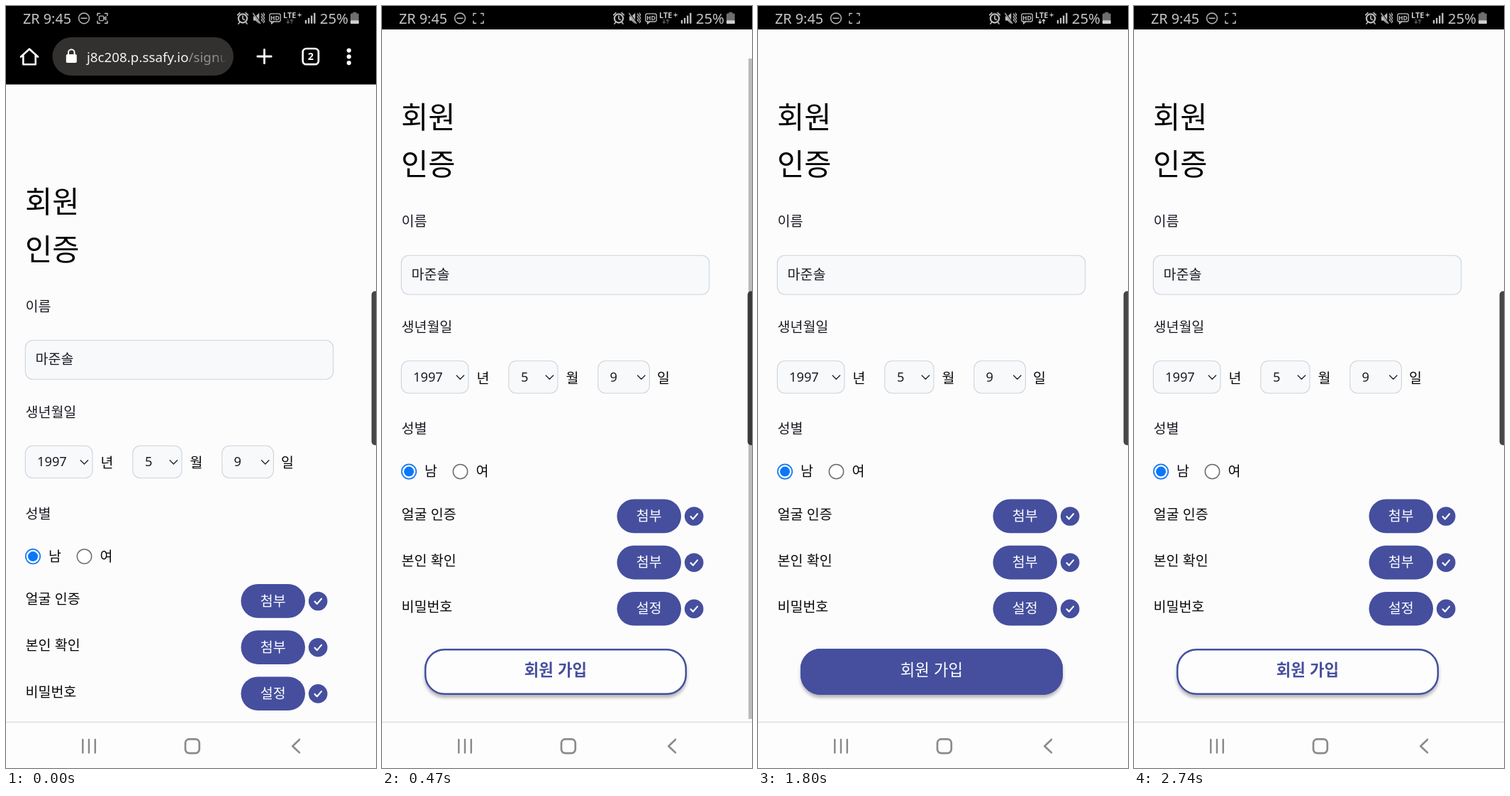
An HTML page that plays this animation: 522x1073 px, repeating every 2830 ms.

```html
<!DOCTYPE html>
<html lang="ko">
<head>
<meta charset="utf-8">
<title>회원 인증</title>
<style>
  html, body { margin: 0; width: 100%; height: 100%; overflow: hidden; background: #fcfcfd; }
  svg { display: block; width: 100vw; height: 100vh; }
  text { font-family: "Noto Sans CJK KR", sans-serif; white-space: pre; }
  .latin { font-family: "Noto Sans", sans-serif; }
  .line { fill: none; stroke-linecap: round; stroke-linejoin: round; }
</style>
</head>
<body>
<svg id="stage" viewBox="0 0 522 1073"></svg>
<script>
const LOOP = 2830;
const SCROLL = 119.5;
const TOOLBAR = 78;
const INDIGO = '#454f9e';
const INK = '#1b1b24';

const text = (x, y, size, fill, value, extra = '') =>
  `<text x="${x}" y="${y}" font-size="${size}" fill="${fill}" ${extra}>${value}</text>`;
const latin = (x, y, size, fill, value, extra = '') =>
  text(x, y, size, fill, value, 'class="latin" ' + extra);
const middle = 'text-anchor="middle"';
const box = (x, y, w, h, r, fill, extra = '') =>
  `<rect x="${x}" y="${y}" width="${w}" height="${h}" rx="${r}" fill="${fill}" ${extra}/>`;
const line = (d, color, width, extra = '') =>
  `<path class="line" d="${d}" stroke="${color}" stroke-width="${width}" ${extra}/>`;
const dot = (x, y, r, fill, extra = '') =>
  `<circle cx="${x}" cy="${y}" r="${r}" fill="${fill}" ${extra}/>`;
const field = (x, y, w, h) => box(x, y, w, h, 10.5, '#f7f9fb', 'stroke="#cfd3da" stroke-width="1.1"');

const select = (x, w, valueX, value, unitX, unit) =>
  field(x, 499.7, w, 45.6) +
  latin(valueX, 528.5, 18.3, INK, value) +
  line(`M${x + w - 16.8} 520.3l5.2 5.2 5.2-5.2`, '#222733', 1.4) +
  text(unitX, 530.5, 19.5, '#08080c', unit);

const row = (index, label, action) => `<g transform="translate(0 ${index * 65.2})">` +
  text(27.5, 722.8, 19.5, '#08080c', label) +
  box(331.5, 694.5, 90.5, 47.7, 23.8, INDIGO) +
  text(376.8, 725, 19.5, '#fff', action, middle) +
  dot(440.2, 718.5, 13.3, INDIGO) +
  line('M435.6 719l3.2 3.4 6.2-7.2', '#fff', 2.2) + '</g>';

const form =
  text(27, 171.5, 41.5, '#000', '회원') +
  text(27, 238, 41.5, '#000', '인증') +
  text(27.5, 310.3, 19.5, INK, '이름') +
  field(27.3, 351.3, 434.4, 55) +
  text(41.5, 384.6, 19.5, INK, '마준솔') +
  text(27.5, 459.3, 19.5, INK, '생년월일') +
  select(27.3, 94.7, 44, '1997', 133.5, '년') +
  select(178.8, 69.2, 196, '5', 259.5, '월') +
  select(304.8, 72.6, 321.5, '9', 388, '일') +
  text(27.5, 602, 19.5, INK, '성별') +
  dot(38, 655.6, 10.2, '#fff', 'stroke="#1479f0" stroke-width="1.7"') +
  dot(38, 655.6, 7, '#0a78f8') +
  text(60, 662, 19.5, '#08080c', '남') +
  dot(110.5, 655.6, 10.2, '#fff', 'stroke="#6c6c70" stroke-width="1.5"') +
  text(132.5, 662, 19.5, '#08080c', '여') +
  row(0, '얼굴 인증', '첨부') + row(1, '본인 확인', '첨부') + row(2, '비밀번호', '설정') +
  `<g filter="url(#shadow)">${box(61.2, 906.2, 367.6, 62.6, 27, '#fdfdfe', `stroke="${INDIGO}" stroke-width="2.5"`)}</g>` +
  text(244.8, 943.3, 22.3, INDIGO, '회원 가입', middle + ' font-weight="700"') +
  '<g id="pressed">' + box(60, 905, 370, 65, 28, INDIGO) +
  text(244.8, 943.3, 22.3, '#fff', '회원 가입', middle) + '</g>';

const modal =
  box(0, 33, 522, 976, 0, '#f3f4f6', 'opacity=".5"') +
  box(57.7, 333.5, 406.8, 375.7, 30, '#fdfdfe', 'stroke="#c6c8d2" stroke-width="1.1"') +
  text(107, 410.3, 28, '#111827', '회원가입 완료', 'font-weight="700"') +
  line('M386.3 397.5l13.8 13.8M400.1 397.5l-13.8 13.8', '#9299a8', 2.3) +
  line('M84 448.5H437M84 549.5H437', '#eaebef', 1.2) +
  text(117.5, 505.6, 22.3, '#666d7a', '환영합니다') +
  box(216, 583, 90, 54, 10, '#1d49d0') +
  text(261, 616.8, 20, '#fff', '확인', middle);

const toolbar =
  box(0, 0, 522, 110.5, 0, '#000') +
  line('M21 71.5L33 60.5 45 71.5M24.3 69.5V82.3H41.7V69.5', '#fff', 2.6) +
  box(65.5, 44, 255.5, 54, 27, '#32312f') +
  box(84.8, 68, 15, 12, 1.8, '#fff') +
  line('M88 68v-2.4a4.3 4.3 0 0 1 8.6 0v2.4', '#fff', 2) +
  `<svg x="0" width="310" height="110">${latin(114, 78.6, 18.8, '#f4f4f4',
    'j8c208.p.ssafy.io<tspan fill="#91908f">/signup</tspan>')}</svg>` +
  box(296, 56, 16, 30, 0, 'url(#fade)') +
  line('M354.8 71H374.2M364.5 61.3V80.7', '#fff', 2.8) +
  box(418.7, 60, 22.2, 22.2, 5, 'none', 'stroke="#fff" stroke-width="2.7"') +
  latin(429.8, 76.3, 14.5, '#fff', '2', middle + ' font-weight="700"') +
  [62.5, 71.3, 80.1].map(y => dot(483.8, y, 3.1, '#fff')).join('');

const GREY = '#bdbdbd';
const statusBar =
  box(0, 0, 522, 33, 0, '#000') +
  latin(24, 24.7, 19.8, '#c4c4c4', 'ZR 9:45') +
  dot(110, 17.3, 7.4, 'none', `stroke="${GREY}" stroke-width="1.5"`) +
  line('M106 17.3h8', GREY, 1.5) +
  line('M129 13.5v-3h3.5M139.5 10.5h3.5v3M143 21.2v3h-3.5M132.5 24.2H129v-3', GREY, 1.5) +
  '<g id="camera">' + box(131.5, 14.2, 6.4, 6.4, 1.5, 'none', `stroke="${GREY}" stroke-width="1.3"`) +
  line('M138 17.3l3-2.3v4.6z', GREY, 1.2) + '</g>' +
  // alarm clock
  dot(334, 17.5, 6.1, 'none', `stroke="${GREY}" stroke-width="2.2"`) +
  line('M334 14v4l2.6 1.4M326.7 12.6l3.2-3M341.3 12.6l-3.2-3M329.5 23l-1.5 2M338.5 23l1.5 2', GREY, 1.7) +
  // muted speaker with vibration
  `<path d="M349 14.5h3.2l5-4.7v15.2l-5-4.6H349z" fill="${GREY}"/>` +
  line('M349 10l10 14.5', '#000', 2.4) + line('M348.6 10.4l10 14', GREY, 1.4) +
  line('M360.5 11l1.5 2-1.5 2.3 1.5 2.3-1.5 2.3 1.5 2M363.3 10l1.3 2.4-1.3 2.3 1.3 2.3-1.3 2.3 1.3 2.3-1.3 2', GREY, 1.3) +
  box(371.8, 10.8, 15.4, 11.2, 2.5, 'none', `stroke="${GREY}" stroke-width="1.3"`) +
  line('M374.5 22v3l3.5-3', GREY, 1.3) +
  latin(379.5, 19.7, 8.6, GREY, 'HD', middle + ' font-weight="700"') +
  latin(391, 17.3, 10.8, '#c8c8c8', 'LTE', 'font-weight="600"') +
  latin(411, 15.7, 11, '#c8c8c8', '+', 'font-weight="700"') +
  line('M397.8 18.8v5.4l-1.7-1.7M397.8 24.2l1.7-1.7M403 24.4V19l-1.7 1.7M403 19l1.7 1.7', '#d8d8d8', 1.3, 'id="arrows"') +
  [5, 8, 11.3, 15].map((h, i) => box(421.8 + i * 4.1, 24.7 - h, 2.4, h, .4, GREY)).join('') +
  latin(442.8, 24.7, 20.4, '#c4c4c4', '25%') +
  box(489.2, 8.8, 5.2, 3, .6, '#6f6f6f') +
  box(486, 10.5, 11.7, 14.5, 1.2, '#6f6f6f') + box(486, 20.3, 11.7, 4.7, 1, '#cfcfcf');

const navBar =
  box(0, 1008, 522, 65, 0, '#fdfdfe') +
  box(0, 1007.7, 522, 1.5, 0, '#dedee2') +
  line('M108.3 1033v18.4M117 1033v18.4M125.8 1033v18.4', '#8a8a8c', 2.5) +
  box(253, 1032.3, 19.8, 19.8, 5.5, 'none', 'stroke="#8a8a8c" stroke-width="2.7"') +
  line('M414 1033l-9.7 9.2 9.7 9.2', '#8a8a8c', 2.6);

document.getElementById('stage').innerHTML = `
  <defs>
    <filter id="shadow" x="-5%" y="-20%" width="110%" height="150%">
      <feDropShadow dx="0" dy="4" stdDeviation="2.2" flood-color="#000" flood-opacity=".28"/>
    </filter>
    <linearGradient id="fade">
      <stop stop-color="#32312f" stop-opacity="0"/><stop offset="1" stop-color="#32312f"/>
    </linearGradient>
  </defs>
  ${box(0, 0, 522, 1073, 0, '#fcfcfd')}
  <g id="form">${form}</g>
  <g id="modal">${modal}</g>
  ${box(517, 36, 6, 930, 0, '#bcbcbe', 'id="scrollbar"')}
  <g id="toolbar">${toolbar}</g>
  ${statusBar}
  ${navBar}
  ${box(515.7, 401.5, 14, 217, 5, '#151518', 'opacity=".78"')}`;

const part = id => document.getElementById(id);
const [page, dialog, bar, header, pressed, camera, arrows] =
  ['form', 'modal', 'scrollbar', 'toolbar', 'pressed', 'camera', 'arrows'].map(part);
const clamp = (v, lo = 0, hi = 1) => Math.min(hi, Math.max(lo, v));
const show = (node, on) => node.setAttribute('visibility', on ? 'visible' : 'hidden');
const moveY = (node, y) => node.setAttribute('transform', `translate(0 ${y})`);

// A slow drag followed by a quick fling, as [time, distance].
const scrollKeys = [[0, 0], [300, 0], [370, 6.3], [400, 30], [430, 85], [460, SCROLL], [LOOP, SCROLL]];
function scrolled(t) {
  const i = scrollKeys.findIndex(key => key[0] > t);
  const [t0, y0] = scrollKeys[i - 1], [t1, y1] = scrollKeys[i];
  return y0 + (y1 - y0) * (t - t0) / (t1 - t0);
}

function draw(t) {
  const y = scrolled(t);
  moveY(page, SCROLL - y);
  moveY(header, -clamp(y - 6.3, 0, TOOLBAR));
  moveY(bar, 38 * y / SCROLL);
  bar.setAttribute('opacity', t > 375 ? clamp((700 - t) / 170) : 0);
  pressed.setAttribute('opacity', t < 2540 ? clamp((t - 900) / 120) : 0);
  show(dialog, t >= 2000 && t < 2540);
  show(camera, t < 300);
  arrows.setAttribute('opacity', t >= 1470 && t < 2540 ? 1 : .4);
}

const start = performance.now();
function tick() {
  draw((performance.now() - start) % LOOP);
  requestAnimationFrame(tick);
}
tick();
</script>
</body>
</html>
```
